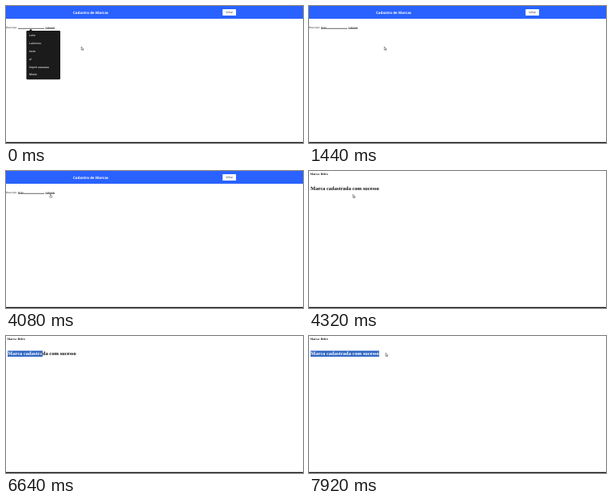
An HTML page that plays this animation: 372 by 172 pixels, repeating every 8000 ms.

```html
<!DOCTYPE html>
<html lang="pt">
<head>
<meta charset="utf-8">
<title>Cadastro de Marcas</title>
<style>
html, body { margin: 0; width: 100%; height: 100%; overflow: hidden; background: #fff; }
svg { display: block; width: 100vw; height: 100vh; }
text { text-rendering: geometricPrecision; white-space: pre; }
.serif { font-family: "Liberation Serif", serif; fill: #111; }
.bold { font-weight: 700; }
.head { font: 700 4.5px "Open Sans", sans-serif; fill: #fff; }
.ui { font-family: Roboto, sans-serif; font-size: 3.5px; }
</style>
</head>
<body>
<svg viewBox="0 0 372 172">
  <defs><clipPath id="clip"><rect id="clipBox" y="18" height="9"/></clipPath></defs>
  <rect width="372" height="172" fill="#fff"/>
  <g id="form">
    <rect width="372" height="16" fill="#2962ff"/>
    <text class="head" x="84" y="10.1">Cadastro de Marcas</text>
    <rect x="271.3" y="4" width="16.8" height="8" rx=".5" fill="#fff"/>
    <text class="ui" x="279.8" y="9.2" text-anchor="middle" font-size="3.2" fill="#444">Voltar</text>
    <text class="serif" x="0" y="27.8" font-size="3.3">Descrição:</text>
    <text class="serif" id="field" x="15.3" y="27.6" font-size="3.1"></text>
    <path d="M15 28.3H48M49.3 28.3H61" stroke="#222" stroke-width=".7"/>
    <text class="serif" x="49.5" y="27.6" font-size="3">Cadastrar</text>
    <g id="menu">
      <path d="M28.8 31.3L31 28.8L33.2 31.3Z" fill="#1b1b1b"/>
      <rect x="25.5" y="31" width="42.5" height="61.3" rx="1.3" fill="#1b1b1b"/>
    </g>
  </g>
  <g id="done">
    <text class="serif bold" x="1.5" y="5" font-size="3.9">Marca: Belro</text>
    <text class="serif bold" id="msg" x="2" y="24.2" font-size="6.52">Marca cadastrada com sucesso</text>
    <g clip-path="url(#clip)">
      <rect x="2" y="18.5" width="90" height="7.5" fill="#2f66c4"/>
      <text class="serif bold" x="2" y="24.2" font-size="6.52" style="fill:#fff">Marca cadastrada com sucesso</text>
    </g>
  </g>
  <rect y="170.8" width="372" height="1.2" fill="#111"/>
  <g id="pointer">
    <path id="arrow" d="M0 0V4.2L1 3.3L1.7 4.8L2.3 4.5L1.7 3.1H3Z" fill="#fff" stroke="#222" stroke-width=".45"/>
    <path id="hand" d="M.4 0H1V1.6L2.7 2V3.2L2.2 4.3H.7L-.4 2.6L.4 2.5Z" fill="#fff" stroke="#222" stroke-width=".45"/>
    <path id="beam" d="M-.6 -2.4H.6M0 -2.4V2.4M-.6 2.4H.6" fill="none" stroke="#444" stroke-width=".35"/>
  </g>
</svg>
<script>
const LOOP = 8000, STEP = 80, BRAND = 'Belro';
const $ = id => document.getElementById(id);
const show = (id, on) => $(id).setAttribute('display', on ? 'inline' : 'none');

['Leite', 'Laticínios', 'teste', 'al', 'Import aaaaaaa', 'Mirelo'].forEach((label, i) => {
  const item = document.createElementNS('http://www.w3.org/2000/svg', 'text');
  item.setAttribute('class', 'ui');
  item.setAttribute('x', 29);
  item.setAttribute('y', 38.3 + i * 9.8);
  item.setAttribute('fill', '#fff');
  item.textContent = label;
  $('menu').append(item);
});

// Pointer path: time, x, y
const path = [
  [0, 94.3, 51], [1800, 94.3, 51], [2640, 44.3, 32.5], [2960, 44.3, 32.5],
  [3520, 55, 29.3], [4840, 55, 29.3], [5120, 1, 19.5], [5360, 2, 22.3],
  [6000, 2, 22.3], [6080, 7.5, 22.3], [6880, 60, 22.3], [7120, 70, 22.3],
  [7440, 90, 21.7], [7680, 96, 21.2], [LOOP, 96, 21.2]
];

function pointerAt(t) {
  const i = path.findIndex(p => p[0] > t);
  const [a, b] = [path[i - 1], path[i]];
  const u = (t - a[0]) / (b[0] - a[0]);
  const k = t < 5400 ? u * u * (3 - 2 * u) : u;
  return [a[1] + (b[1] - a[1]) * k, a[2] + (b[2] - a[2]) * k];
}

// Selection snaps to whole letters
function selectionEnd(x) {
  const msg = $('msg');
  let end = 2;
  for (let i = 0; i < msg.getNumberOfChars(); i++) {
    const left = msg.getStartPositionOfChar(i).x, right = msg.getEndPositionOfChar(i).x;
    if (x > (left + right) / 2) end = right;
  }
  return end;
}

function draw(now) {
  const t = Math.floor((now % LOOP) / STEP) * STEP;
  const sent = t >= 4320;
  const [x, y] = pointerAt(t);
  show('form', !sent);
  show('done', sent);
  show('menu', t < 400);
  const typed = Math.max(0, Math.floor((t - 240) / 160));
  $('field').textContent = BRAND.slice(0, typed);
  if (sent) $('clipBox').setAttribute('width', t < 6080 ? 0 : selectionEnd(x));

  const beam = t >= 5280 && x < 89;
  const hand = t >= 3440 && !sent;
  show('beam', beam);
  show('hand', hand);
  show('arrow', !beam && !hand);
  $('pointer').setAttribute('transform', `translate(${x} ${y})`);
}

const start = performance.now();
function tick() {
  draw(performance.now() - start);
  requestAnimationFrame(tick);
}
tick();
</script>
</body>
</html>
```
